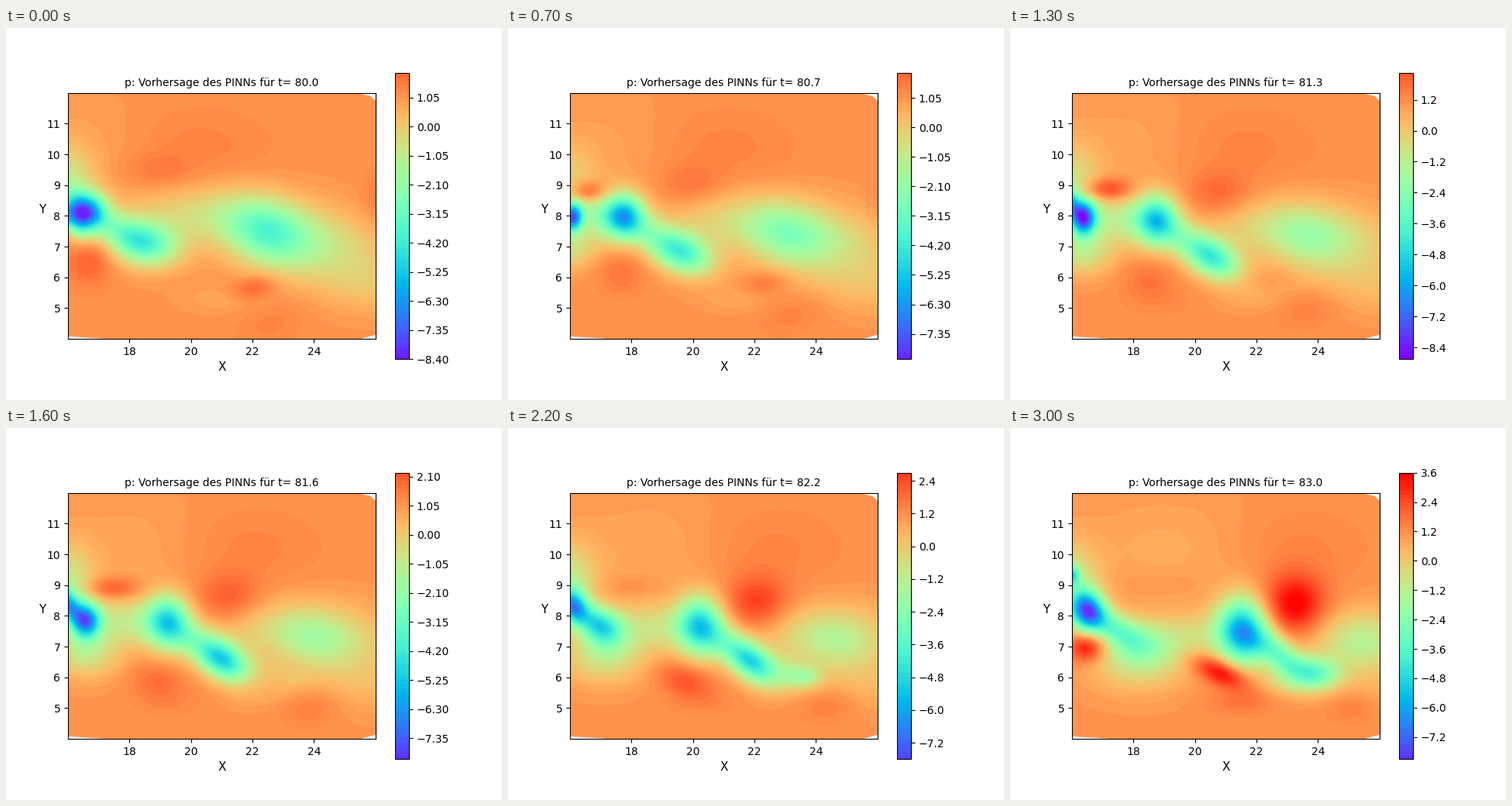
A matplotlib script that plays this animation: 640 by 480 pixels, repeating every 3100 ms.

```python
import matplotlib.pyplot as plt
import numpy as np
from matplotlib.animation import FuncAnimation

FRAMES, STEP = 31, 0.15
VMIN, VMAX, BASE = -8.85, 3.6, 1.1

# pressure range covered by the scale over time
KEYS = [0, 0.4, 0.9, 1.3, 1.9, 2.6, 3.0]
LOW = [-8.4, -7.65, -8.7, -8.85, -7.35, -8.25, -8.1]
HIGH = [1.95, 1.95, 1.95, 2.25, 2.25, 3.15, 3.6]

# corners without data
GAPS = [[(16, 4), (16, 4.08), (17.3, 4)],
        [(25.5, 4), (26, 4.13), (26, 4)],
        [(25.35, 12), (25.83, 11.9), (26, 11.75), (26, 12)],
        [(16, 12), (16.13, 12), (16, 11.94)]]

X, Y = np.meshgrid(np.linspace(16, 26, 221), np.linspace(4, 12, 177))


def ramp(t, start, end):
    return np.clip((t - start) / (end - start), 0, 1)


def pulse(t, centre, width):
    return np.exp(-((t - centre) / width) ** 2)


def bell(x, y, cx, cy, sx, sy, rot):
    c, s = np.cos(np.radians(rot)), np.sin(np.radians(rot))
    u = (x - cx) * c + (y - cy) * s
    v = (y - cy) * c - (x - cx) * s
    return np.exp(-0.5 * ((u / sx) ** 2 + (v / sy) ** 2))


# Every part below is (x, y, sx, sy, angle, pressure, weight) at time t.

def vortices(t):
    """Low-pressure cores, from the youngest at the inflow downstream."""
    a, b, e = t - 1.3, t - 1.9, t - 2.6
    return [
        (16.02, 9.2 + .35 * e, .16, .22, 0, -5, ramp(t, 2.2, 2.6)),
        (15.95 + .19 * a * a, 8.5 - .2 * a, .2 + .12 * a, .32 + .1 * a,
         12 * a, -5.5 - 1.7 * a, ramp(t, .9, 1.3)),
        (15.9 + .12 * t + .2 * t * t, 7.95 + .08 * t - .11 * t * t,
         .2 + .02 * t + .045 * t * t, .3 + .06 * t, -7 * t,
         -3.3 - 5.6 * pulse(t, 1.15, 1), 1),
        (16.63 + 1.63 * t, 8.12 - .2 * t, .42 + .05 * t, .44 + .1 * t, 0,
         -8.4 + 3.2 * t - .87 * t * t, 1),
        (18.5 + 1.75 * t - .1 * t * t, 7.1 - .55 * t + .13 * t * t,
         .76 - .07 * t, .5 - .05 * t, -10 - 15 * t,
         -4.4 + .35 * t - 2.2 * pulse(t, 1.9, .45), 1),
        (23.55 + .4 * b, 6 + .1 * b, .3 + .2 * b, .2 + .16 * b, 0,
         -1.3 - 2.1 * b, ramp(t, 1.5, 1.9)),
        (22.45 + .8 * t + .1 * t * t, 7.45 - .1 * t, 1 - .08 * t,
         .72 - .04 * t, -22 + 8 * t, -3.9 + 1.8 * t - .3 * t * t, 1),
    ]


def ridges(t):
    """High-pressure spots beside the wake."""
    young, late = t - .4, t - 2.6
    return [
        # below
        (16.7 + 1.38 * t, 6.6 - .75 * t + .2 * t * t, .5 + .05 * t,
         .58 - .1 * t, -8 * t, 1.9 - .6 * t + .34 * t * t, 1),
        (22.05 + .45 * t, 5.67 + .22 * t, .5, .25, 10, 1.8 - .55 * t * t,
         1 - ramp(t, 1.3, 1.7)),
        (22.6 + .83 * t, 4.5 + .55 * t - .12 * t * t, .8 - .06 * t,
         .48 - .03 * t, 20 - 7 * t, 1.4, 1),
        (18.8 + 1.6 * (t - 1.3), 5.23, .95 - .07 * t, .45 - .05 * t, 0,
         1.2 + .18 * t, ramp(t, .9, 1.3)),
        (16.2 + .75 * late, 7, .4, .34, 0, 1.3 + 3.5 * late,
         ramp(t, 2.2, 2.6)),
        # above
        (18.9 + 1.45 * t, 9.45 - .75 * t + .13 * t * t, .75 - .02 * t,
         .38 + .1 * t, 0, 1.6 - .2 * t + .29 * t * t, 1),
        (16.3 + .95 * young, 8.75 + .12 * young, .3 + .18 * t, .24, 0,
         1 + 1.2 * pulse(t, 1.3, .6), ramp(t, 0, .6)),
        (26, 8.6, .3, .6, 0, 1.45, 1 - ramp(t, .4, .8)),
    ]


def hazes(t):
    """Broad clouds; here the pressure is an offset."""
    return [
        (20.2 + 1.45 * t, 8 - .28 * t, 1.55 - .22 * t, .67, 0,
         -1.4 + .2 * t, 1),
        (23.9 + .57 * t, 7.2, 1.7 - .23 * t, .78, -12 + 4 * t,
         -1.9 + .28 * t, 1),
        (15.9 + .25 * t * t, 6.95 - .1 * t, .4 + .23 * t, .35 + .12 * t, 0,
         -2, ramp(t, 0, .9)),
        (23, 5.85, .7, .35, 0, -1.1, ramp(t, 1.2, 2.6)),
        (16, 9.1, .6, .85, 0, -2 + .9 * pulse(t, .8, .5), 1),
        (25.8, 5.7, 1.4, .6, -5, -.8 + .13 * t, 1),
        (20.2 + t, 10.2, 1.6, .9, 0, .33, 1),
        (17 + .7 * t, 10.2, 1.3 + .3 * t, 1.2, 0, -.2 - .07 * t, 1),
        (20.9 + .8 * t, 5.3, .8, .3, 0, -.35, 1 - ramp(t, 1.3, 2)),
    ]


def bridge(a, b, width, offset):
    """Haze stretched between two vortices."""
    dx, dy = b[0] - a[0], b[1] - a[1]
    return ((a[0] + b[0]) / 2, (a[1] + b[1]) / 2, .35 * np.hypot(dx, dy),
            width, np.degrees(np.arctan2(dy, dx)), offset, a[6] * b[6])


def pressure(t):
    cores = vortices(t)
    _, inlet, young, main, lower, tail, _ = cores
    clouds = hazes(t) + [bridge(inlet, young, .35, -2.5),
                         bridge(young, main, .55, -2.6 + .45 * t),
                         bridge(main, lower, .42, -2),
                         bridge(lower, tail, .35, -1.5)]
    spots = cores + ridges(t)

    def ground(x, y):
        return BASE + sum(w * p * bell(x, y, *shape)
                          for *shape, p, w in clouds)

    # choose amplitudes so that each spot reaches its own pressure
    mat, rhs = np.eye(len(spots)), np.zeros(len(spots))
    for i, (x, y, *_, p, w) in enumerate(spots):
        row = np.array([bell(x, y, *s[:5]) for s in spots])
        mat[i] = w * row + (1 - w) * mat[i]
        rhs[i] = w * (p - ground(x, y))
    amps = np.linalg.solve(mat, rhs)
    return ground(X, Y) + sum(a * bell(X, Y, *s[:5])
                              for a, s in zip(amps, spots) if s[6] > 0)


def update(i):
    t = i / 10
    lo = round(np.interp(t, KEYS, LOW) / STEP)
    hi = round(np.interp(t, KEYS, HIGH) / STEP)
    levels = np.arange(lo, hi + 1) * STEP
    field = np.clip(pressure(t), levels[0] + 1e-3, levels[-1] - 1e-3)

    fig.clf()
    ax = fig.add_subplot()
    ax.set_aspect("equal")
    cs = ax.contourf(X, Y, field, levels=levels, cmap="rainbow",
                     vmin=VMIN, vmax=VMAX)
    for gap in GAPS:
        ax.fill(*zip(*gap), color="white", lw=0)
    ax.set(xlim=(16, 26), ylim=(4, 12),
           xticks=range(18, 25, 2), yticks=range(5, 12))
    ax.set_xlabel("X", fontsize=11)
    ax.set_ylabel("Y", rotation=0, fontsize=11)
    ax.set_title(f"p: Vorhersage des PINNs für t= {80 + t:.1f}", fontsize=10)
    fig.colorbar(cs, ax=ax)
    return []


fig = plt.figure(figsize=(6.4, 4.8), dpi=100)
anim = FuncAnimation(fig, update, frames=FRAMES, interval=100,
                     repeat=True, repeat_delay=0)
plt.show()
```
